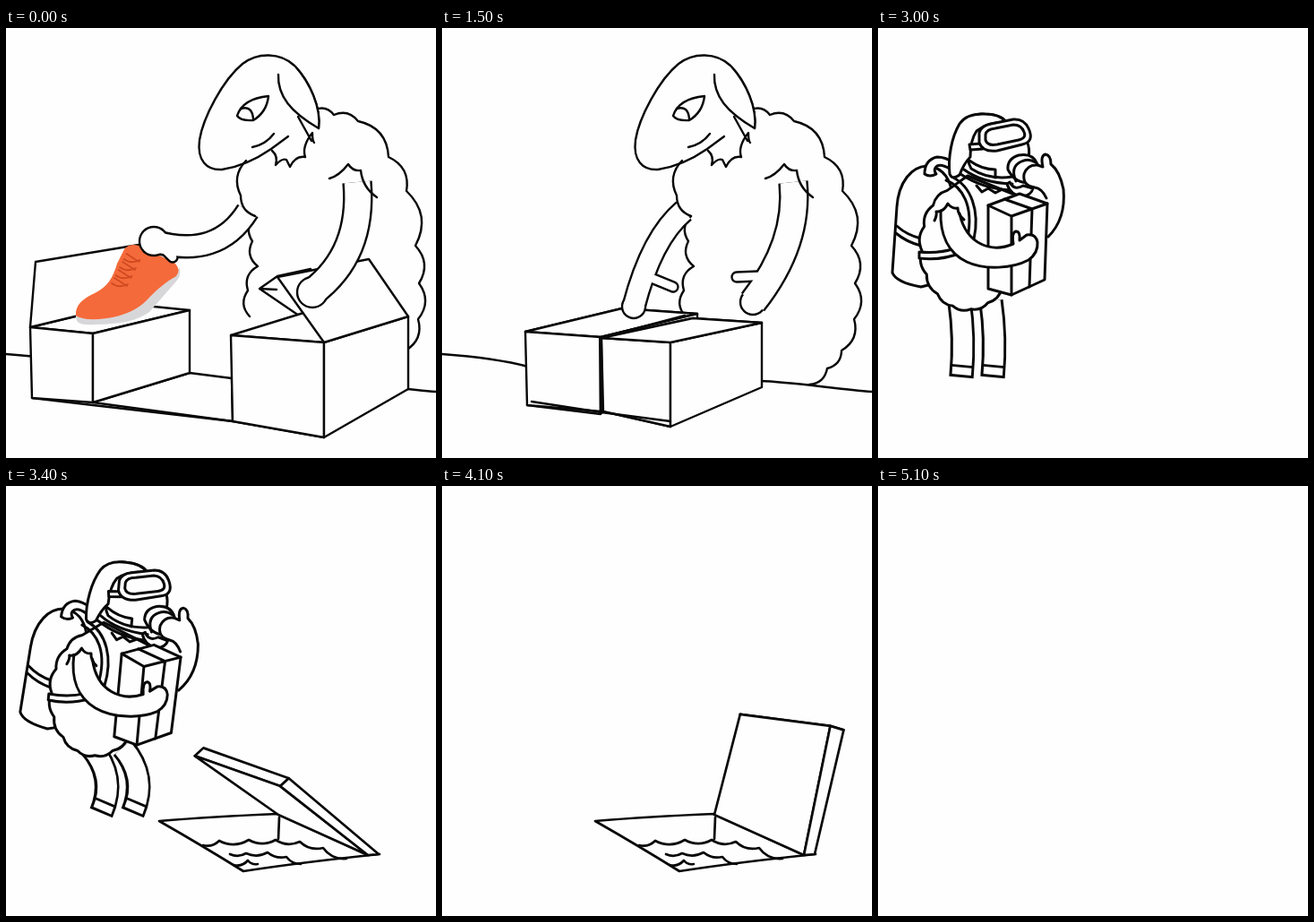
Animation of 480 by 480 pixels, one loop 5200 ms. Source, as an HTML page with a canvas:

```html
<!DOCTYPE html>
<html lang="en">
<head>
<meta charset="utf-8">
<title>Sheep packs a box</title>
<style>
html, body { margin: 0; width: 100%; height: 100%; overflow: hidden; background: #fefefe; }
canvas { display: block; width: 100vw; height: 100vh; }
</style>
</head>
<body>
<canvas id="stage" width="480" height="480"></canvas>
<script>
const ctx = document.getElementById('stage').getContext('2d');
const LOOP = 5200, PAPER = '#fefefe', INK = '#080808';
const { sin, cos, PI, floor, hypot, abs } = Math;

const mix = (a, b, k) => a + (b - a) * k;
const mixAll = (a, b, k) => a.map((v, i) => mix(v, b[i], k));
const clamp = v => Math.max(0, Math.min(1, v));
const smooth = v => { const u = clamp(v); return u * u * (3 - 2 * u); };
const add = (p, x, y) => [p[0] + x, p[1] + y];

function ink(d, fill = PAPER) {
  const p = new Path2D(d);
  if (fill) { ctx.fillStyle = fill; ctx.fill(p); }
  ctx.stroke(p);
}
const line = d => ink(d, null);
const trace = pts => 'M' + pts.map(p => p.join(',')).join('L');
const poly = (...pts) => ink(trace(pts) + 'Z');
const open = (...pts) => line(trace(pts));

function band(d, width, color) {
  ctx.lineWidth = width;
  ctx.strokeStyle = color;
  line(d);
}

function paint(d, color) {
  ctx.fillStyle = color;
  ctx.fill(new Path2D(d));
}

// Draws with a temporary shift of the paper
function shifted(x, y, fn) {
  ctx.save();
  ctx.translate(x, y);
  fn();
  ctx.restore();
}

// Row of arcs through points, bulging to the left of travel
function scallop(pts, bulge) {
  return 'M' + pts[0] + pts.slice(1).map(([u, v], i) => {
    const [x, y] = pts[i];
    return `Q${(x + u) / 2 + (v - y) * bulge},${(y + v) / 2 - (u - x) * bulge} ${u},${v}`;
  }).join('');
}

// Points spread evenly over an elliptic arc
const arc = (cx, cy, rx, ry, from, to, n) => Array.from({ length: n + 1 }, (_, i) => {
  const a = mix(from, to, i / n);
  return [cx + rx * cos(a), cy + ry * sin(a)];
});

/* ---------- packing ---------- */

// Bend, hand, fist radius, thumb root and thumb tip: at the start and at the end
const LEFT_ARM = [[236, 259, 165, 238, 16, 176, 246, 186, 256], [234, 234, 214, 311, 13, 236, 280, 258, 289]];
const RIGHT_ARM = [[399, 252, 342, 295, 17, 350, 288, 343, 284], [399, 240, 347, 306, 14, 352, 277, 329, 278]];
// Corner, width, drop, left and right height, depth and bottom rise: open and closed
const LEFT_HALF = [[27, 334, 70, 7, 79, 77, 108, -26, -33], [93, 339, 84, 6, 82, 83, 108, -26, -30]];
const RIGHT_HALF = [[251, 343, 104, 8, 96, 106, 94, -29, -54], [178, 346, 77, 5, 82, 94, 102, -22, -44]];

function half(states, k) {
  const [x, y, w, drop, h, h2, dx, dy, rise] = mixAll(...states, k);
  const a = [x, y], b = add(a, w, drop), c = add(b, 0, h2);
  return { a, b, c, d: add(a, 2, h), far: add(b, dx, dy), low: add(c, dx, rise), back: add(a, dx, dy) };
}

function box({ a, b, c, d, far, low }) {
  poly(a, b, c, d);
  poly(b, far, low, c);
}

function arm(shoulder, width, states, k) {
  const [bx, by, hx, hy, r, ...thumb] = mixAll(...states, k);
  ctx.save();
  for (const [edge, color] of [[1.2, INK], [-1.2, PAPER]]) {
    ctx.lineCap = 'butt';
    band(`M${shoulder}Q${bx},${by} ${hx},${hy}`, width + edge * 2, color);
    ctx.lineCap = 'round';
    band(`M${thumb.slice(0, 2)}L${thumb.slice(2)}`, 11 + edge * 2, color);
    band(`M${hx},${hy}h.01`, (r + edge) * 2, color);
  }
  ctx.restore();
}

function sheep() {
  line(scallop([[345, 91], [366, 97], [393, 104], [427, 144], [447, 182], [457, 243],
    [461, 285], [460, 325], [446, 360], [430, 380], [410, 398]], .38));
  line(scallop([[278, 210], [275, 238], [281, 266], [270, 293], [272, 322]], -.4));
  ink('M349,112C352,88 338,58 322,42C306,27 281,27 264,40C242,58 220,100 216,125C213,148 224,159 241,158C262,155 280,146 296,135L315,121');
  line('M275,133Q290,130 299,118');
  ink('M304,52C303,76 318,94 349,112C352,90 340,62 323,43');
  line('M326,99L341,126M297,137Q304,143 301,153Q308,145 313,147L317,155Q323,142 334,144Q330,132 342,117Q342,126 344,128');
  ink('M258,98Q264,79 293,76Q291,94 276,103Q262,104 258,98Z');
  line('M262,90Q275,86 276,102');
}

function shoe() {
  paint('M78,319C77,330 83,332 100,331C128,331 148,326 160,317L189,284Q196,277 194,268L160,290Q130,318 78,319Z', '#d7d7da');
  paint('M78,321C77,309 86,302 99,296C113,289 119,280 124,263L132,247Q139,239 151,244L188,262Q196,270 190,277C179,283 168,292 158,303Q140,322 104,325Q84,326 78,321Z', '#f56a3a');
  ctx.save();
  for (let i = 0; i < 4; i++) {
    const x = 118 + i * 4.5, y = 285 - i * 9;
    band(`M${x},${y}q8,6 18,1m-15,-7l14,9`, 1.8, '#cf4a22');
  }
  ctx.restore();
}

function packing(t) {
  const h = t < 700 ? t : 700 + floor((t - 700) / 200) * 200;
  const fold = smooth((h - 550) / 550), slide = clamp((h - 1100) / 400);
  const l = half(LEFT_HALF, slide), r = half(RIGHT_HALF, slide);
  const lift = 40 * sin(PI * fold);
  const tip = (from, to) => add(mixAll(from, to, fold), 0, -lift);

  line('M0,364C40,367 70,371 96,378M355,394C390,395 440,403 480,406');
  sheep();

  poly(l.c, l.low, add(r.d, -1, mix(-48, -30, slide)), r.d);
  open(l.d, add(l.c, 0, 3), r.d, r.c);

  const leftLid = () => poly(l.a, tip([33, 261], l.b), tip([148, 242], l.far), l.back);
  poly(l.a, l.b, l.far, l.back);
  if (fold < .25) leftLid();
  if (fold < .7) {
    ctx.save();
    ctx.clip(new Path2D(trace([[0, 0], [480, 0], [480, 250], l.far, l.b, l.a, [0, 330]])));
    shifted(0, clamp(t / 600) * 78, shoe);
    ctx.restore();
  }
  if (fold >= .25) leftLid();
  box(l);

  if (fold < .5) ink('M327,321L283,291L303,277L340,269M283,291L302,292');
  poly(r.a, r.b, r.far, r.back);
  box(r);
  poly(r.b, tip([303, 278], r.a), tip([405, 258], r.back), r.far);

  if (slide === 1) {
    line('M100,417L178,429L255,439M180,345L271,321');
    band('M177,346L178,428', 4, INK);
    ctx.lineWidth = 2.4;
  }
  arm([270, 204], 25, LEFT_ARM, smooth(h / 1500));
  line(scallop([[268, 148], [262, 187], [278, 210]], -.35));
  arm([392, 172], 31, RIGHT_ARM, smooth((h - 600) / 900));
  line('M361,168Q372,165 382,152Q387,160 396,159Q398,178 414,189');
}

/* ---------- diver ---------- */

// Breathing, then a crouch, then a leap along a parabola
function divePose(t) {
  if (t < 3000) {
    const reach = abs(floor(t / 200) * 200 - 2400) / 25;
    return { x: reach ? 3 : 0, y: reach ? 3 : 0, turn: 0, reach, bend: 0, swing: 0 };
  }
  const v = (t - 3400) / 100, air = v >= 0;
  return {
    x: 124 * smooth((t - 3350) / 450) + 10 * clamp((v - 4) / 2),
    y: air ? -13 - 29.5 * v + 9 * v * v : 12 * sin(PI * (t - 3000) / 400),
    turn: air ? .09 - .01 * v : .09 * (1 + v / 4),
    reach: 0,
    bend: air ? 1 : 0,
    swing: air ? mix(9, 28, clamp(v / 4)) : 0
  };
}

function leg(hip, knee, [x, y]) {
  const dx = x - knee[0], dy = y - knee[1], len = hypot(dx, dy), ux = dx / len, uy = dy / len;
  const shape = cut => `M${hip}Q${knee} ${x - ux * cut},${y - uy * cut}`;
  ctx.save();
  ctx.lineCap = 'butt';
  band(shape(0), 27.4, INK);
  band(shape(3), 21.4, PAPER);
  band(`M${x - ux * 14},${y - uy * 14}l${ux * 2.8},${uy * 2.8}`, 24, INK);
  ctx.restore();
}

function legs({ x, y, reach, bend, swing }) {
  for (const left of [0, 35]) {
    const fx = 128 - left, fy = 390;
    const foot = bend ? [fx + swing + x, fy - 12 + y] : [fx, fy + (reach ? 4 : 0)];
    leg([126 - left + x, 305 + y], [132 - left + 22 * bend + x, 346 - 8 * bend + y], foot);
  }
}

function torso() {
  // tank and hose
  ink('M48,289Q20,284 16,273L21,200C23,171 38,155 54,154Q76,155 82,180L60,286Z');
  line('M21,221Q32,231 48,235M20,229Q32,239 48,243');
  ink('M52,163Q52,147 66,144Q75,144 84,150L80,157Q68,150 64,156Q62,159 65,163Q58,167 52,163Z');

  // wool and harness
  ink(scallop(arc(100, 244, 51, 70, .72, 4.25, 9), .3) + 'L100,165L150,185');
  line('M76,170C94,177 107,198 100,234M82,166C104,176 114,204 107,236');
  ink('M46,250Q68,252 86,246L93,251Q70,260 46,257Z');
}

function head() {
  ink('M102,133Q98,147 104,157Q124,170 150,166L168,144Q170,135 166,126L143,105Q138,96 115,96Q103,97 100,108Z');
  line('M102,148Q116,158 131,158V167M96,158Q116,173 150,174M92,163Q118,180 149,181');
  line('M110,176l6,7l7,-4l8,5l6,-3');
  ink('M80,163C78,145 82,122 91,107Q99,95 119,96Q136,96 143,105Q122,105 110,115Q103,125 103,144Q96,151 91,164Q83,170 80,163Z');
  ink('M102,130L114,129L117,135L103,136Z');
  ink('M113,117Q115,109 126,107L151,102Q163,101 168,112Q175,127 161,130L133,137Q117,139 113,128Z');
  ink('M120,119Q121,113 131,112L151,108Q160,108 163,116Q166,123 157,125L133,130Q122,132 120,125Z');
}

function mouthpiece() {
  ink('M144,174Q148,187 161,188Q171,187 173,179L162,176Q152,182 147,172Z');
  ink('M145,158Q144,146 157,142Q173,139 178,152Q182,167 170,172Q154,175 145,158Z');
  line('M154,171Q147,155 160,149Q168,145 176,150');
  ink('M188,190Q183,179 175,178Q161,176 163,163Q167,152 178,153L184,155Q181,142 187,141Q193,142 193,152Q203,160 207,180Q210,213 190,233');
}

function parcel() {
  ink('M123,198L158,185L189,196L186,281L149,298L123,291Z');
  line('M123,198L149,210L189,196M149,210L149,298M141,191L172,202L169,289');
  ink('M70,204C69,230 78,251 99,261C120,271 151,268 168,259Q179,251 178,239Q176,229 166,231L158,237Q159,227 154,227Q149,228 151,241C128,251 99,243 91,207');
  line('M63,215Q66,209 65,205Q73,206 78,196Q82,202 89,201Q89,208 96,214');
}

function diver(pose) {
  ctx.save();
  ctx.lineWidth = 3;
  legs(pose);
  ctx.translate(100 + pose.x, 220 + pose.y);
  ctx.rotate(pose.turn);
  ctx.translate(-100, -220);
  torso();
  head();
  shifted(pose.reach, 0, mouthpiece);
  parcel();
  ctx.restore();
}

/* ---------- hatch ---------- */

// Lid angle: swings open, waits, closes the same way
function lidAngle(t) {
  const u = clamp((Math.min(t, 8100 - t) - 3200) / 450);
  return 96 * PI / 180 * (1 - (1 - u ** 1.8) ** 2);
}

function hatch(t) {
  const a = lidAngle(t), c = cos(a), s = sin(a);
  const farHinge = [304, 367], nearHinge = [404, 412];
  const far = add(farHinge, -133 * c + 15 * s, 7 * c - 112 * s);
  const near = add(nearHinge, -139 * c + 15 * s, 18 * c - 143 * s);
  const thick = p => add(p, 15 * s, 3 * s - 14 * c);

  ink('M171,374Q230,369 304,366L404,412L417,411Q330,420 265,430Q220,402 171,374Z');
  line('M305,370L304,394');
  shifted(t % 400 ? 0 : 1, 0, () => {
    line(scallop([[220, 401], [238, 396], [271, 395], [301, 395], [328, 397], [354, 404], [380, 416]], -.28));
    line(scallop([[250, 411], [268, 410], [292, 409], [313, 414], [329, 422]], -.25));
    line(scallop([[254, 423], [270, 418], [281, 422]], -.3));
  });
  poly(far, thick(far), thick(near), near);
  poly(far, near, nearHinge, farHinge);
  poly(near, thick(near), [416, 411], nearHinge);
}

function diving(t) {
  ctx.lineWidth = 2.7;
  if (t >= 3100 && t < 5100) hatch(t);
  if (t >= 4100) return;
  ctx.save();
  // hide what is below the water
  if (t >= 3700) ctx.clip(new Path2D('M0,0H480V405L380,415L330,403L300,400L257,403L222,403L171,374L0,300Z'));
  diver(divePose(t));
  ctx.restore();
}

function draw(now) {
  const t = floor(now % LOOP / 100) * 100;
  ctx.fillStyle = PAPER;
  ctx.fillRect(0, 0, 480, 480);
  ctx.strokeStyle = INK;
  ctx.lineWidth = 2.4;
  ctx.lineCap = ctx.lineJoin = 'round';
  if (t < 2000) packing(t); else diving(t);
}

const start = performance.now();
function tick() {
  draw(performance.now() - start);
  requestAnimationFrame(tick);
}
tick();
</script>
</body>
</html>
```
